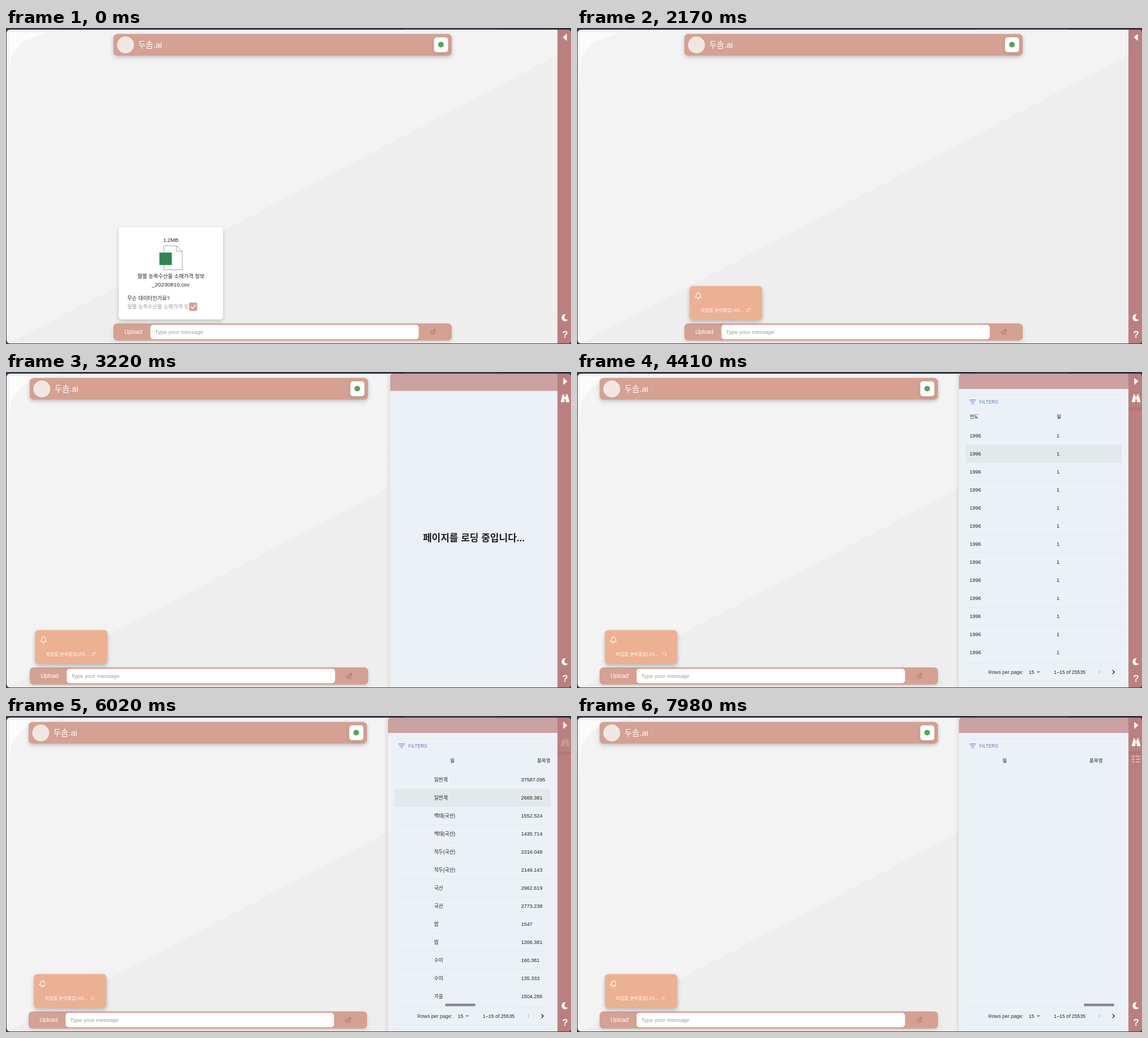
These frames come from a looping animation (1000x560 px, 8000 ms). An HTML page with a canvas:

```html
<!DOCTYPE html>
<html lang="ko">
<head>
<meta charset="utf-8">
<style>
  html, body { margin: 0; width: 100%; height: 100%; overflow: hidden; background: #353e4a; }
  canvas { display: block; width: 1000px; height: 560px; }
</style>
</head>
<body>
<canvas id="stage"></canvas>
<script>
const canvas = document.getElementById('stage');
const g = canvas.getContext('2d');
const dpr = window.devicePixelRatio || 1;
canvas.width = 1000 * dpr;
canvas.height = 560 * dpr;

const LOOP = 8000;
const FONT = '"Liberation Sans", "Noto Sans CJK KR", "Noto Sans CJK", sans-serif';
const BAR = '#d4a192', SIDE = '#ba7f7e';
const T = { sent: 980, analyse: 1820, open: 2795, table: 3640, stop: 7070 };

const COLS = ['연도', '월', '품목명', '품종명', '평균가격'];
const KINDS = [['쌀', '일반계'], ['콩', '백태(국산)'], ['팥', '적두(국산)'], ['녹두', '국산'],
  ['고구마', '밤'], ['감자', '수미'], ['배추', '가을']];
const PRICES = ['37587.095', '2668.381', '1552.524', '1435.714', '2316.048', '2149.143',
  '2962.619', '2773.238', '1547', '1266.381', '160.381', '135.333', '1504.286'];

const SCROLL = [[4480, 0], [5100, 330], [6020, 399], [6580, 484.5], [7070, 969]];
const HEAD = [[4480, 0], [4600, 63], [6860, 63], [7070, 96]];
const GLASS = [[2800, 0], [2870, 0.55], [3080, 1], [5200, 1], [5950, 0.2], [6600, 0.2], [7000, 1]];
const LIST = [[7350, 0], [7980, 0.7]];
const TILT = [[4700, 0], [5100, 0.25]];

function track(keys, t) {
  if (t <= keys[0][0]) return keys[0][1];
  for (let i = 1; i < keys.length; i++) {
    const [a, va] = keys[i - 1], [b, vb] = keys[i];
    if (t < b) return va + (vb - va) * (t - a) / (b - a);
  }
  return keys[keys.length - 1][1];
}

// CSS "ease": cubic-bezier(.25, .1, .25, 1)
function ease(x) {
  if (x <= 0) return 0;
  if (x >= 1) return 1;
  let lo = 0, hi = 1;
  for (let i = 0; i < 24; i++) {
    const s = (lo + hi) / 2, r = 1 - s;
    if (0.75 * r * s + s * s * s < x) lo = s; else hi = s;
  }
  const r = 1 - lo;
  return 0.3 * r * r * lo + 3 * r * lo * lo + lo ** 3;
}

function rect(x, y, w, h, color) {
  g.fillStyle = color;
  g.fillRect(x, y, w, h);
}

function box(x, y, w, h, r, color, shadow) {
  g.save();
  if (shadow) {
    g.shadowColor = `rgba(0,0,0,${shadow})`;
    g.shadowBlur = 7 * dpr;
    g.shadowOffsetY = 3 * dpr;
  }
  g.beginPath();
  g.roundRect(x, y, w, h, r);
  g.fillStyle = color;
  g.fill();
  g.restore();
}

function disc(x, y, r, color) {
  g.beginPath();
  g.arc(x, y, r, 0, 7);
  g.fillStyle = color;
  g.fill();
}

function text(s, x, y, size, color, weight = 400, align = 'left') {
  g.font = `${weight} ${size}px ${FONT}`;
  g.textAlign = align;
  g.fillStyle = color;
  g.fillText(s, x, y);
}

function poly(points, close) {
  g.beginPath();
  points.forEach(([x, y]) => g.lineTo(x, y));
  if (close) g.closePath();
}

function stroke(points, color, width, close) {
  poly(points, close);
  g.strokeStyle = color;
  g.lineWidth = width;
  g.stroke();
}

function fill(points, color) {
  poly(points, true);
  g.fillStyle = color;
  g.fill();
}

function at(x, y, draw, angle = 0, alpha = 1) {
  g.save();
  g.translate(x, y);
  g.rotate(angle);
  g.globalAlpha = alpha;
  draw();
  g.restore();
}

function backdrop() {
  rect(0, 0, 1000, 560, '#353e4a');
  rect(92, 0, 613, 3, '#2c3440');
  rect(870, 0, 130, 3, '#2c3440');
  g.beginPath();
  g.roundRect(1, 3, 999, 556, 6);
  g.clip();
  rect(0, 0, 1000, 560, '#f3f3f3');
  fill([[0, 562], [976, 48], [976, 560]], '#eeeeee');
  fill([[5, 8], [75, 8], [30, 24], [8, 50], [5, 100]], '#fbfbfb');
}

function header() {
  box(190, 10.5, 599, 38.5, 7, BAR, 0.2);
  disc(211.5, 30, 15, '#f0e7e3');
  text('두솜.ai', 234, 35, 14.5, '#fff', 500);
  box(757.5, 16.5, 25, 26.5, 5, '#fff', 0.1);
  disc(769.8, 29.5, 5, '#53a55c');
}

function composer() {
  box(190, 523.5, 599, 30.5, 7, BAR, 0.12);
  text('Upload', 209.5, 542, 10, '#fff');
  box(255.5, 526, 475, 25.5, 5, '#fff');
  text('Type your message', 263.5, 542, 9.8, '#9b9b9b');
  at(755, 538.5, () => {
    g.lineJoin = 'round';
    stroke([[5, -5], [-5, 0.6], [-2, 2], [-1.4, 5], [0.3, 3], [3.3, 4.2]], '#b17674', 1, true);
    stroke([[-2, 2], [5, -5], [0.3, 3]], '#b17674', 0.8);
  });
}

function fileCard() {
  box(199.5, 353, 184.5, 163.5, 5, '#fff', 0.2);
  text('1.2MB', 291.7, 379, 9.4, '#222', 400, 'center');
  stroke([[279.5, 386], [302, 386], [312, 396], [312, 428.5], [279.5, 428.5]], '#a3a3a3', 1, true);
  stroke([[302, 386], [302, 396], [312, 396]], '#a3a3a3', 1);
  rect(271.5, 398, 22, 22, '#2f8750');
  text('월별 농축수산물 소매가격 정보', 292, 442.5, 9.3, '#222', 400, 'center');
  text('_20230810.csv', 291.5, 457.5, 9.9, '#222', 400, 'center');
  text('무슨 데이터인가요?', 214.5, 482, 9.2, '#222');
  g.save();
  g.beginPath();
  g.rect(214, 485, 108, 18);
  g.clip();
  text('월별 농축수산물 소매가격 정보', 214.5, 497, 9.2, '#9c9c9c');
  g.restore();
  box(324, 486.5, 14.5, 15, 3, BAR);
  stroke([[327, 494], [330, 497.2], [336, 490.5]], '#fff', 1.3);
}

function notice(t) {
  box(199.5, 457.5, 128, 60, 6, '#ecb092', 0.26);
  at(214.5, 474.5, () => {
    g.strokeStyle = '#fff';
    g.lineWidth = 1.1;
    g.beginPath();
    g.moveTo(-5, 3.2);
    g.quadraticCurveTo(-3.4, 1.6, -3.4, -1.2);
    g.arc(0, -1.6, 3.4, Math.PI, 0);
    g.quadraticCurveTo(3.4, 1.6, 5, 3.2);
    g.closePath();
    g.moveTo(-1.6, 4.6);
    g.quadraticCurveTo(0, 6.6, 1.6, 4.6);
    g.moveTo(0, -6.2);
    g.lineTo(0, -5);
    g.stroke();
  }, track(TILT, t));
  const label = t < T.analyse ? '파일을 전송 중입니다...' : '파일을 분석중입니다...';
  text(label, 218.8, 503, 8.1, '#fff');
  at(304.5, 500.3, () => {
    g.beginPath();
    g.arc(0, 0, 3.2, 0.9, 5.4);
    g.strokeStyle = 'rgba(255,255,255,.8)';
    g.lineWidth = 0.9;
    g.stroke();
  }, (Math.min(t, T.stop) - T.stop) / 1000 * 2 * Math.PI);
}

function loading(left, w) {
  const size = 17, max = w - 7;
  g.font = `700 ${size}px ${FONT}`;
  const lines = [''];
  for (const part of '페이지를 로딩 중입니다...'.match(/\s|\S\.*/g)) {
    const n = lines.length - 1;
    if (lines[n] && g.measureText(lines[n] + part).width > max) lines.push(part.trim());
    else lines[n] += part;
  }
  const wide = lines.length > 1 ? max : g.measureText(lines[0]).width;
  const x = left + (w - wide) / 2;
  lines.forEach((s, i) => text(s, x, 300.3 + 22.2 * (i - (lines.length - 1) / 2), size, '#1d1d1f', 700));
}

function cell(row, col) {
  if (col === 0) return '1996';
  if (col === 1) return '1';
  if (col === 4) return PRICES[row];
  return KINDS[row >> 1][col - 2];
}

function table(t) {
  const s = track(SCROLL, t), h = track(HEAD, t);
  const line = '#e1e7eb';
  rect(690, 39.5, 270, 1, line);
  rect(694.5, 49, 11.5, 1.2, '#5d7dc0');
  rect(696.5, 52.5, 7.5, 1.2, '#5d7dc0');
  rect(699, 56, 2.6, 1.2, '#5d7dc0');
  text('FILTERS', 712, 55.5, 8.3, '#5d7dc0');

  g.save();
  g.beginPath();
  g.rect(688, 62, 276, 446);
  g.clip();
  COLS.forEach((name, c) => text(name, 695 + 154 * c - h, 82, 8.5, '#222', 500));
  const end = Math.min(276, 770 - s);
  if (end > 0) {
    rect(688, 129, end, 32, '#e3e8ea');
    for (let r = 0; r < 13; r++) {
      if (r > 1) rect(688, 128.5 + 32 * r, end, 0.8, line);
      COLS.forEach((_, c) => text(cell(r, c), 695 + 154 * c - s, 115.7 + 32 * r, c > 1 && c < 4 ? 8.6 : 9, '#222'));
    }
  }
  g.restore();

  if (s > 0) box(777 + (s - 399) / 4.75, 509.7, 54, 4.6, 2.3, '#868889');
  rect(690, 515, 270, 0.8, line);
  rect(690, 547, 270, 0.8, line);
  text('Rows per page:', 728, 535, 8.9, '#333');
  text('15', 799.5, 535, 9, '#222');
  fill([[813.5, 530.5], [819.5, 530.5], [816.5, 533.5]], '#777');
  text('1–15 of 25535', 844, 535, 8.8, '#222');
  stroke([[926.3, 528.5], [923.3, 531.7], [926.3, 535]], '#b4b9bd', 1.1);
  stroke([[948, 528.5], [951, 531.7], [948, 535]], '#222', 1.4);
}

function panel(t, w) {
  const left = 976 - w, ready = t >= T.table;
  const edge = g.createLinearGradient(left - 8, 0, left, 0);
  edge.addColorStop(0, 'rgba(225,215,213,0)');
  edge.addColorStop(1, 'rgba(225,215,213,.7)');
  rect(left - 8, 3, 8, 556, edge);
  g.save();
  g.beginPath();
  g.roundRect(left, 3, w, 555.5, [5, 0, 0, 5]);
  g.clip();
  rect(left, 3, w, 556, '#ebf1f6');
  rect(left, 3, w, ready ? 27 : 30.5, '#cba2a0');
  if (ready) table(t); else loading(left, w);
  g.restore();
}

function binoculars() {
  for (const k of [-1, 1]) {
    fill([[k, -4.5], [k * 5, -4.5], [k * 7.5, 5], [k * 7.5, 7], [k * 1.5, 7], [k, 1]], '#fff');
    rect(k * 3.2 - 1.6, -7, 3.2, 2, '#fff');
  }
  rect(-1, -2.5, 2, 4, '#fff');
}

function checklist() {
  for (let i = -1; i < 2; i++) {
    const y = i * 5;
    if (i < 1) stroke([[-7, y], [-5.6, y + 1.4], [-3, y - 1.6]], '#fff', 1.1);
    else disc(-5.3, y, 1.2, '#fff');
    rect(-1, y - 0.6, 8, 1.2, '#fff');
  }
}

function sidebar(t) {
  rect(976, 3, 24, 557, SIDE);
  const turn = ease((t - 2800) / 250);
  at(989.5, 16.5, () => fill([[4, 0], [-3.2, -6.5], [-3.2, 6.5]], '#fff'), Math.PI * (1 + turn));
  if (t >= T.table) {
    rect(976, 63.5, 24, 1, '#a56e6e');
    rect(976, 64.5, 24, 4, 'rgba(150,95,95,.2)');
  }
  at(989.5, 46.5, binoculars, 0, track(GLASS, t));
  at(989.5, 76.5, checklist, 0, track(LIST, t));
  at(989.5, 513.5, () => {
    g.beginPath();
    g.arc(0, 0, 6.2, 0.5, 5);
    g.bezierCurveTo(-3.5, -2.5, -1.5, 4.5, 5.4, 3);
    g.fillStyle = '#fff';
    g.fill();
  });
  text('?', 989.5, 549, 17, '#fff', 700, 'center');
}

function draw(t) {
  const w = 300 * ease((t - T.open) / 500);
  g.setTransform(dpr, 0, 0, dpr, 0, 0);
  g.save();
  backdrop();
  at(-w / 2, 0, () => {
    header();
    composer();
    if (t < T.sent) fileCard(); else notice(t);
  });
  if (w > 0) panel(t, w);
  sidebar(t);
  g.restore();
}

const start = performance.now();
function tick() {
  draw((performance.now() - start) % LOOP);
  requestAnimationFrame(tick);
}
tick();
</script>
</body>
</html>
```
